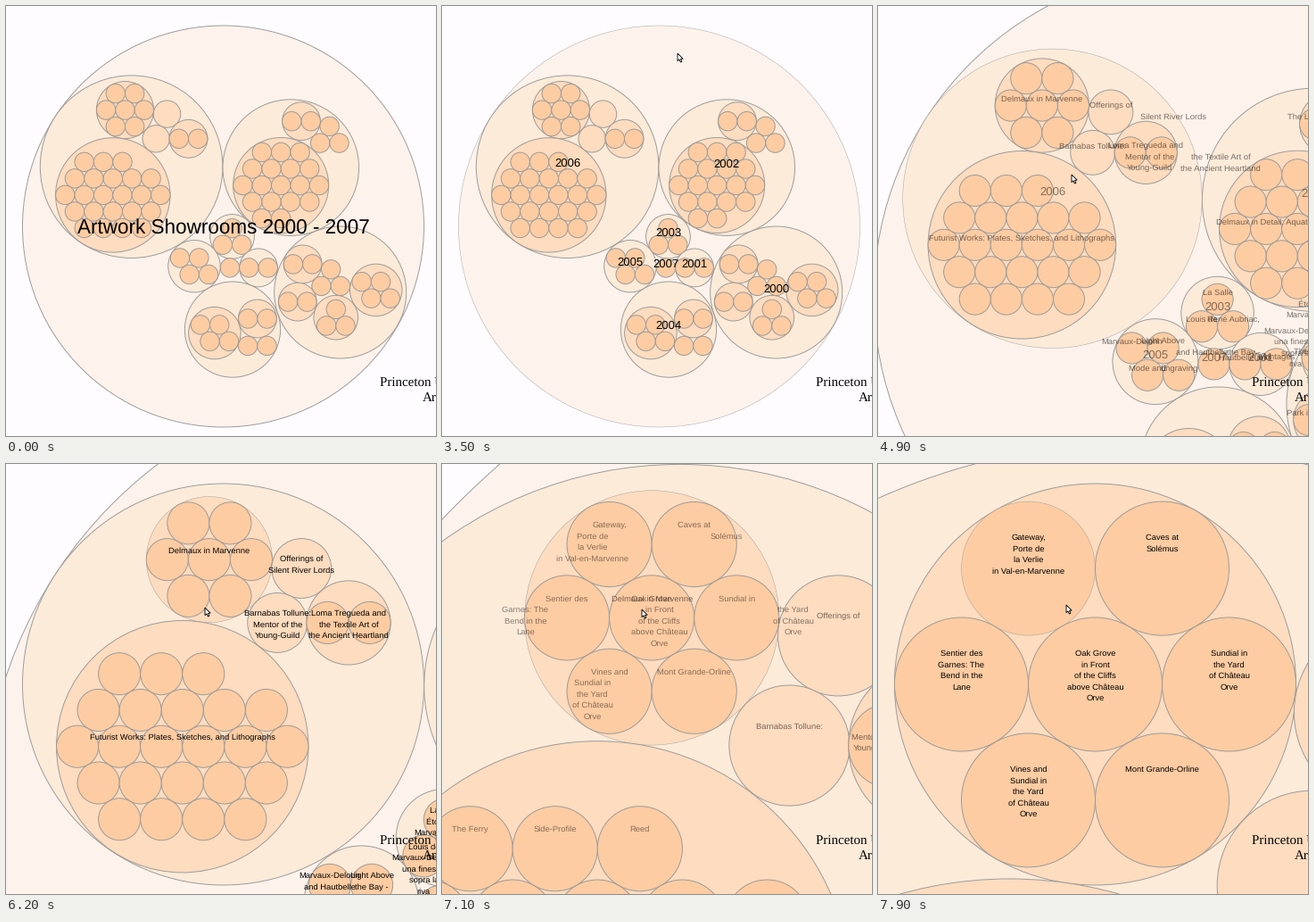
Write a matplotlib script that moves like this. It is 482 px wide and 482 px high and loops after 8000 ms.

```python
import math
from itertools import cycle

import numpy as np
import matplotlib.pyplot as plt
from matplotlib.animation import FuncAnimation
from matplotlib.patches import Circle, Polygon

SIZE, DPI = 482, 100
PX = 72 / DPI                      # points per pixel
STEP, LOOP = 100, 8000
CX, CY, RADIUS = 243.5, 247, 225   # where the focused circle sits
A = 10.7                           # leaf radius at the outermost view
LINE = 12.5
STROKE = 0.94 * PX
BACK = "#fefcff"
FILLS = ["#fef3ec", "#fcebd9", "#fddcbf", "#fdcca2"]
LEAF = 3

VIEWS = [(243.5, 247, 225), (140.6, 180.2, 102.3), (133.5, 116.6, 3 * A)]
ZOOMS = [4133, 6367]
ZOOM_TIME = 1500
FADE_START, FADE_TIME = 2700, 750

# time, x, y of the pointer
POINTER = np.array([
    (100, 3, 472), (400, 472, 106), (2200, 410, 40), (2600, 264, 53),
    (3700, 264, 53), (4100, 217, 189), (5500, 217, 189), (5800, 223, 161),
    (6300, 223, 161), (7100, 224, 163), (7300, 224, 163), (7700, 211, 158)])

# time from which a circle is hovered
HOVERS = [(0, None), (200, "root"), (500, None), (2400, "root"), (4000, "2006"),
          (5200, "prints"), (5700, "painter"), (7700, "leaf")]

plt.rcParams["text.hinting"] = "none"
plt.rcParams["font.family"] = "Liberation Sans"

fig = plt.figure(figsize=(SIZE / DPI, SIZE / DPI), dpi=DPI, facecolor=BACK)
ax = fig.add_axes([0, 0, 1, 1])
ax.set_xlim(0, SIZE)
ax.set_ylim(SIZE, 0)
ax.axis("off")

circles, labels, named = [], [], {}


def write(x, y, text, px, ha="center", **style):
    return ax.text(x, y, text, fontsize=px * PX, ha=ha, va="baseline",
                   color="black", zorder=3, **style)


def node(x, y, r, fill, level, text="", key=None):
    """One circle with its label; level tells when the label shows."""
    patch = Circle((x, y), r, facecolor=FILLS[fill], edgecolor="#999999",
                   linewidth=STROKE)
    ax.add_patch(patch)
    circles.append((patch, x, y, r))
    if key:
        named[key] = patch
    if text:
        px = 13.15 if level == 1 else 9.4
        lines = [write(x, y, s, px) for s in text.split("/")]
        labels.append((lines, x, y - 5, level, px))


def rows(*spec):
    """Hexagonal rows given as (first x, count), in leaf radii."""
    mid = (len(spec) - 1) / 2
    return [(x + 2 * i, (j - mid) * math.sqrt(3))
            for j, (x, n) in enumerate(spec) for i in range(n)]


def group(x, y, shape, depth, text="", titles=(), key=None, leaf_key=None):
    r = A * (1 + max(math.hypot(*p) for p in shape))
    node(x, y, r, depth, depth, text, key)
    titles = list(titles) + [""] * len(shape)
    for i, (dx, dy) in enumerate(shape):
        node(x + A * dx, y + A * dy, A, LEAF, depth + 1, titles[i],
             leaf_key if i == 0 else None)


def single(x, y, text):
    node(x, y, A, LEAF, 2, text)


PAIR = rows((-1, 2))
TRIO = rows((0, 1), (-1, 2))
FOUR = rows((-1.5, 2), (-0.5, 2))
SEVEN = rows((-1, 2), (-2, 3), (-1, 2))

node(*VIEWS[0], 0, 0, key="root")

node(*VIEWS[1], 1, 1, "2006", key="2006")
group(133.5, 116.6, SEVEN, 2, "Delmaux in Marvenne", [
    "Gateway,/Porte de/la Verlie/in Val-en-Marvenne",
    "Caves at/Solémus",
    "Sentier des/Garnes: The/Bend in the/Lane",
    "Oak Grove/in Front/of the Cliffs/above Château/Orve",
    "Sundial in/the Yard/of Château/Orve",
    "Vines and/Sundial in/the Yard/of Château/Orve",
    "Mont Grande-Orline"], key="painter", leaf_key="leaf")
spare = cycle(["Harbour", "Two Chairs", "Night Field", "Study", "Wheel", "Blue Door"])
prints = ["The Ferry", "Side-Profile", "Reed"] + [next(spare) for _ in range(20)]
group(119.8, 211.9, rows((-3, 3), (-4, 5), (-5, 6), (-4, 5), (-3, 4)), 2,
      "Futurist Works: Plates, Sketches, and Lithographs", prints, key="prints")
node(180.5, 121.1, 15.2, 2, 2, "Offerings of/Silent River Lords")
node(168.2, 148.8, 15.2, 2, 2, "Barnabas Tollune:/Mentor of the/Young-Guild")
group(204.5, 148.8, PAIR, 2,
      "Loma Tregueda and/the Textile Art of/the Ancient Heartland",
      ["Jar", "Bowl"])

node(319.3, 181.1, 76.3, 1, 1, "2002")
group(308.2, 201, rows((-2, 3), (-3, 4), (-4, 5), (-3, 4), (-2, 2)), 2,
      "Delmaux in Detail: Aquatints from the Oswin")
group(331, 129.2, PAIR, 2, "The Lamp of the North:")
single(362.6, 134.9, "Paper Capital")
single(352.1, 153.6, "Ansgar Mellin:")
single(373.5, 153.6, "Madrigals")

node(374.7, 321, 74, 1, 1, "2000")
group(332.6, 289.4, PAIR, 2, "The Romantic Shore:")
group(326.8, 331.6, PAIR, 2, "Park in Old Harbour:")
group(414.7, 318.4, FOUR, 2, "Masters of the Plain")
group(369.8, 349.2, TRIO, 2, "Studio Souvenirs: 1890-1922")
single(364.2, 295.3, "Monuments")
single(353.5, 313.9, "New Realism")
single(374.9, 313.9, "Vienne")

group(253.5, 258.4, TRIO, 1, "2003", [
    "La Salle/Étoile and/Marvaux-Delorin",
    "Louis de/Marvaux-Delorin:/una finestra/sopra la/riva",
    "René Aubriac,"])
group(211, 291.7, FOUR, 1, "2005", [
    "Marvaux-Delorin/and Hautbelle", "Light Above/the Bay -",
    "Mode and", "Engraving"])
node(251, 293.4, A, LEAF, 1, "2007")
group(283, 293.4, PAIR, 1, "2001", ["Hautbelle and", "Montages"])

node(254, 362.6, 53.6, 1, 1, "2004")
group(233.9, 366.6, FOUR, 2, "Morvigli: Beyond the Calm")
group(281.9, 350.5, PAIR, 2, "Delmaux in the Garden: Still Life")
single(271.1, 380.9, "Delmaux")
single(292.5, 380.9, "Corvo: Clásico")

title = write(CX, 255, "Artwork Showrooms 2000 - 2007", 22.56)
for x, y, s in [(419, 427, "Princeton University"), (467, 444, "Art")]:
    write(x, y, s, 15.04, ha="left", family="Liberation Serif")

ARROW = np.array([(0, 0), (0, 8.6), (2, 6.9), (3.4, 10), (4.9, 9.3),
                  (3.5, 6.3), (6.2, 6.2)])
pointer = Polygon(ARROW, facecolor="white", edgecolor="black",
                  linewidth=0.9 * PX, zorder=4)
ax.add_patch(pointer)


def ease(u):
    u = min(max(u, 0), 1)
    return 4 * u ** 3 if u < 0.5 else 1 - 4 * (1 - u) ** 3


def project(x, y, view):
    k = RADIUS / view[2]
    return CX + (x - view[0]) * k, CY + (y - view[1]) * k, k


def update(frame):
    t = frame * STEP
    e1, e2 = (ease((t - start) / ZOOM_TIME) for start in ZOOMS)
    now = 1 if t >= ZOOMS[1] else 0
    e = (e1, e2)[now]
    fade = ease((t - FADE_START) / FADE_TIME)
    shown = {1: fade * (1 - e1), 2: e1 * (1 - e2), 3: e2}

    def place(x, y):
        a = np.array(project(x, y, VIEWS[now]))
        b = np.array(project(x, y, VIEWS[now + 1]))
        return a + (b - a) * e, b[0]

    key = [k for start, k in HOVERS if t >= start][-1]
    hovered = named.get(key)
    for patch, x, y, r in circles:
        (sx, sy, k), _ = place(x, y)
        patch.center = sx, sy
        patch.set_radius(r * k)
        patch.set_linewidth(STROKE * (0.45 if patch is hovered else 1))

    # Only the first line glides; the lines below stand at their final x.
    for lines, x, y, level, px in labels:
        (sx, sy, _), end_x = place(x, y)
        alpha = shown[level]
        for i, line in enumerate(lines):
            lx, ly = (end_x if i else sx), sy + 0.35 * px + i * LINE
            inside = -150 < lx < SIZE + 150 and -20 < ly < SIZE + 20
            line.set_visible(alpha > 0.004 and inside)
            line.set_position((lx, ly))
            line.set_alpha(alpha)

    title.set_alpha(1 - fade)
    title.set_visible(fade < 1)
    tip = [np.interp(t, POINTER[:, 0], POINTER[:, i]) for i in (1, 2)]
    pointer.set_xy(ARROW + tip)
    pointer.set_visible(100 <= t <= 400 or t >= 2200)
    return []


anim = FuncAnimation(fig, update, frames=LOOP // STEP, interval=STEP,
                     repeat=True, repeat_delay=0, blit=False)
plt.show()
```
